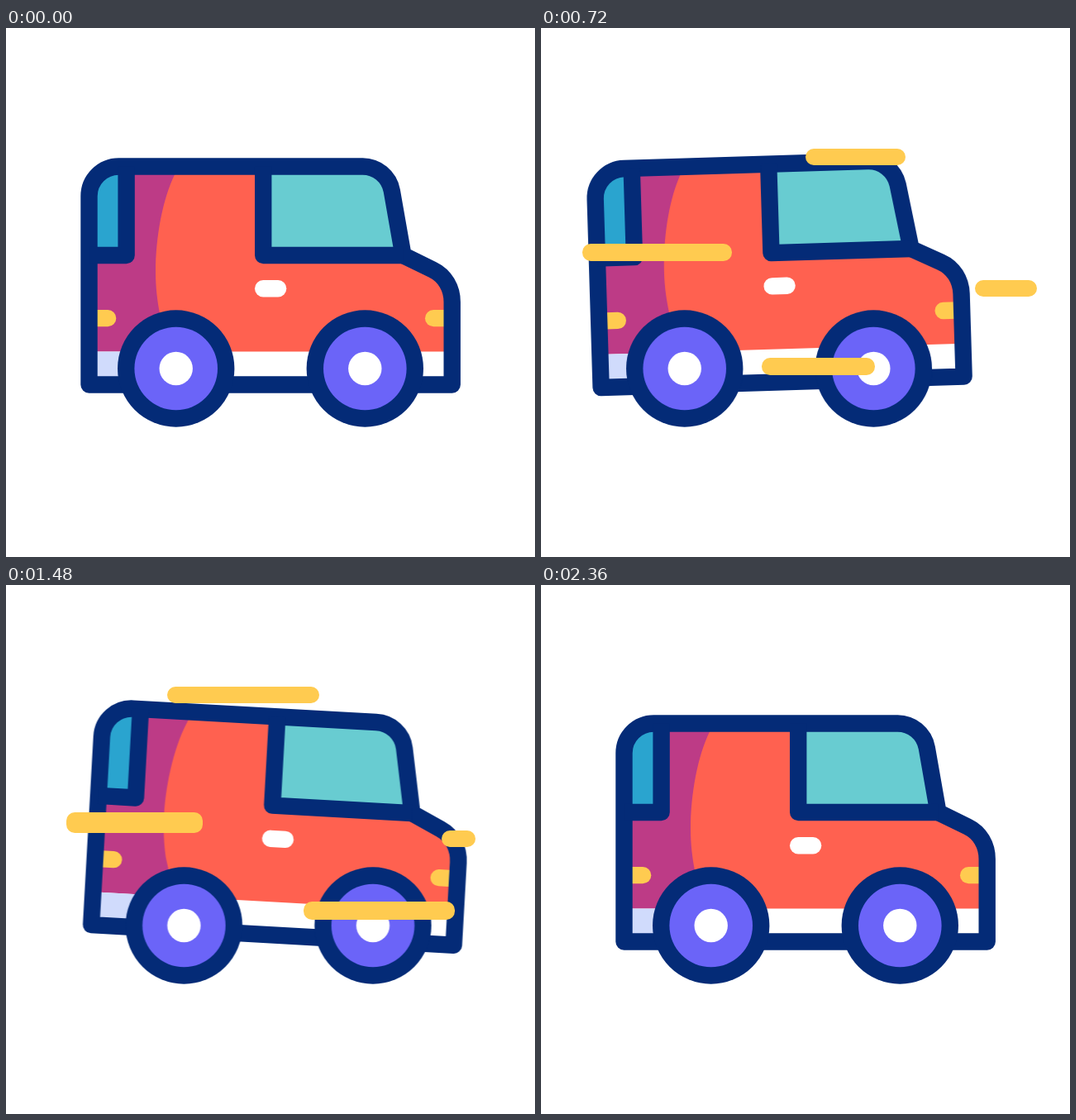
Animation, 640 px wide and 640 px high, one loop 2420 ms. Source, as an HTML page:

```html
<!DOCTYPE html>
<html lang="en">
<head>
<meta charset="utf-8">
<title>Driving van</title>
<style>
  @property --head { syntax: "<number>"; inherits: false; initial-value: 0; }
  @property --tail { syntax: "<number>"; inherits: false; initial-value: 0; }

  html, body { margin: 0; width: 100%; height: 100%; overflow: hidden; background: #fff; }
  #stage { position: relative; width: 640px; height: 640px; overflow: hidden; }
  svg { display: block; }

  .car, .body, .streak {
    --ease: cubic-bezier(.333, 0, .667, 1);
    animation: 2420ms var(--ease) infinite;
  }
  .car { animation-name: drive; }
  .body { animation-name: bounce, tilt; transform-origin: 320px 300px; }

  @keyframes drive {
    0% { transform: translateX(0); }
    23.14% { transform: translateX(-51.5px); }
    47.11% { transform: translateX(52px); animation-timing-function: cubic-bezier(.52, 0, .667, 1); }
    71.9% { transform: translateX(-33.4px); animation-timing-function: cubic-bezier(.333, 0, .37, 1); }
    97.52%, 100% { transform: translateX(0); }
  }
  @keyframes bounce {
    0% { translate: 0 0; }
    23.14% { translate: 0 -7px; }
    38.84% { translate: 0 3px; }
    52.07% { translate: 0 -9.25px; }
    71.07% { translate: 0 -6.3px; }
    85.12%, 100% { translate: 0 0; }
  }
  @keyframes tilt {
    0% { rotate: 0deg; }
    23.55% { rotate: -2.5deg; }
    50.83%, 71.07% { rotate: 3.2deg; }
    97.52%, 100% { rotate: 0deg; }
  }

  /* Each streak grows leftwards over 200px, then its tail catches up. */
  .streak {
    --h: 20.4;
    position: absolute;
    left: calc((var(--x) - 200 * var(--head) - 10.2) * 1px);
    top: calc((var(--y) - var(--h) / 2) * 1px);
    width: calc((200 * (var(--head) - var(--tail)) + 20.4) * 1px);
    height: calc(var(--h) * 1px);
    border-radius: 10.2px;
    background: #ffcb50;
    opacity: 0;
    animation-name: head, tail, show;
    animation-delay: var(--at);
  }
  @keyframes head {
    0% { --head: 0; }
    17.98%, 100% { --head: 1; }
  }
  @keyframes tail {
    0%, 11.78% { --tail: 0; }
    28.1%, 100% { --tail: 1; }
  }
  @keyframes show {
    0%, 28.1% { opacity: 1; }
    28.11%, 100% { opacity: 0; }
  }
</style>
</head>
<body>
<div id="stage">
  <svg width="640" height="640" viewBox="0 0 640 640">
    <defs>
      <path id="shell" d="M100.5 431.5V203.5A36 36 0 0 1 136.5 167.5H431A36 36 0 0 1 466.8 197L480.5 275L516 292.3C531 299.500 539.700 314.500 539.700 331.500V431.500Z"/>
      <clipPath id="inside"><use href="#shell"/></clipPath>
      <g id="wheel">
        <circle r="70.700" fill="#042b77"/>
        <circle r="50.300" fill="#6b64f8"/>
        <circle r="20.200" fill="#fff"/>
      </g>
    </defs>
    <g class="car">
      <g class="body">
        <g clip-path="url(#inside)">
          <rect x="90" y="157" width="460" height="285" fill="#ff6150"/>
          <path d="M90 157H214L204 177.500C190 206 181 252 181 295C181 313 183 330 186 345L200 395H90Z" fill="#bd3b86"/>
          <rect x="100" y="391.500" width="440" height="40" fill="#fff"/>
          <rect x="100" y="391.500" width="100" height="40" fill="#d0dbfc"/>
          <rect x="100" y="167" width="45" height="108" fill="#2aa4cf"/>
          <path d="M311 167H470L481 275H311Z" fill="#68ccd1"/>
          <rect x="80" y="341" width="53.300" height="20.300" rx="10.150" fill="#ffcb50"/>
          <rect x="507" y="341" width="53.300" height="20.300" rx="10.150" fill="#ffcb50"/>
        </g>
        <rect x="301" y="305" width="38.300" height="20.400" rx="10.200" fill="#fff"/>
        <g fill="none" stroke="#042b77" stroke-width="20.400" stroke-linejoin="round">
          <use href="#shell"/>
          <path d="M100.500 275H145.600V167.500M311.200 167.500V275H480.500"/>
        </g>
      </g>
      <use href="#wheel" x="205.700" y="412"/>
      <use href="#wheel" x="434.300" y="412"/>
    </g>
  </svg>
  <div class="streak" style="--x:530; --y:156; --at:239ms"></div>
  <div class="streak" style="--x:254; --y:271.400; --at:333ms"></div>
  <div class="streak" style="--x:394; --y:409.500; --at:479ms"></div>
  <div class="streak" style="--x:590; --y:315; --at:572ms"></div>
  <div class="streak" style="--x:561; --y:394.300; --h:22; --at:1102ms"></div>
  <div class="streak" style="--x:377; --y:133; --at:1149ms"></div>
  <div class="streak" style="--x:228; --y:287.200; --h:25; --at:1196ms"></div>
  <div class="streak" style="--x:558; --y:307; --at:1394ms"></div>
</div>
</body>
</html>
```
